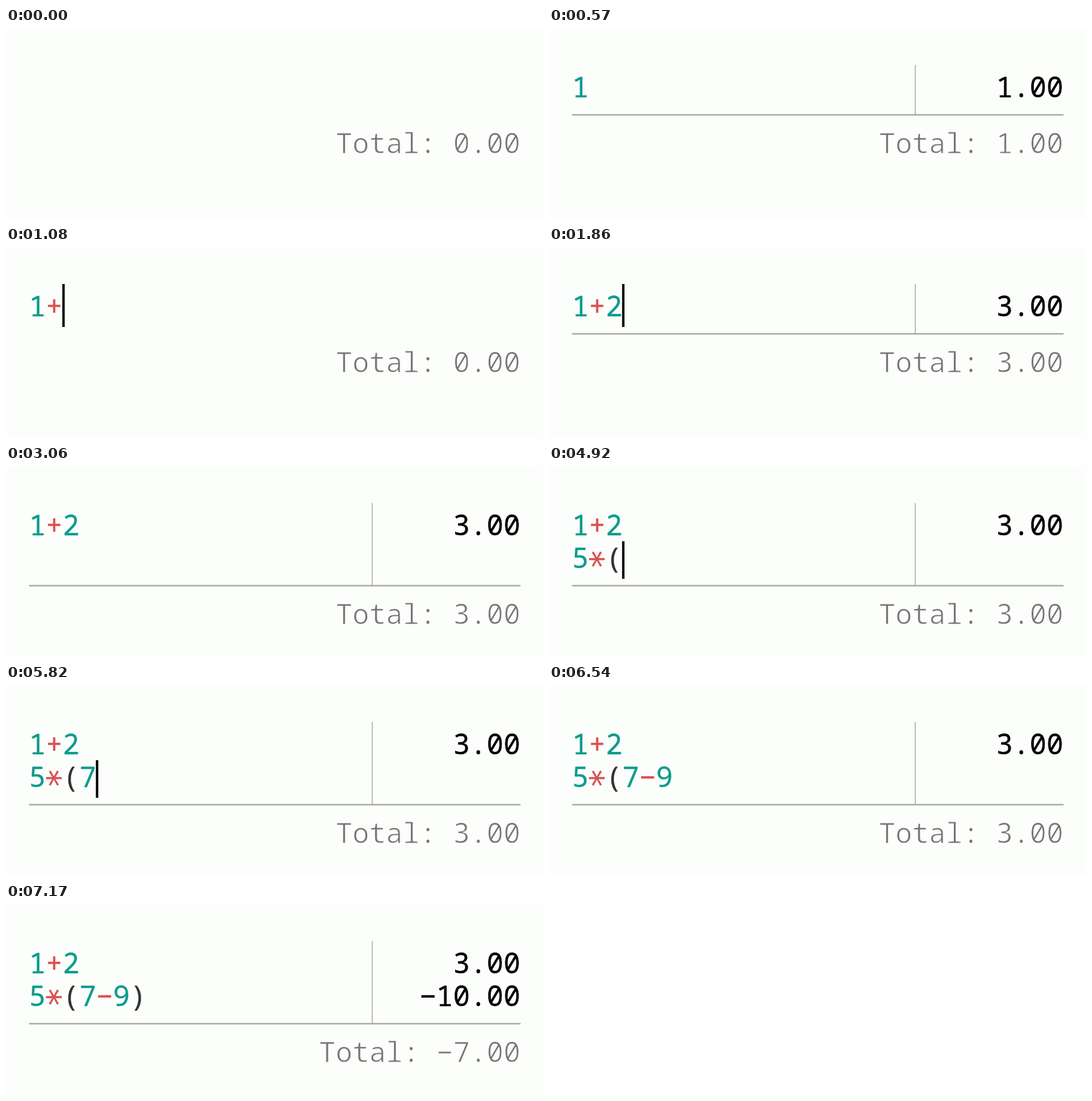
Animation of 898 by 320 pixels, one loop 7.2 s. Source, as an HTML page:

```html
<!DOCTYPE html>
<html lang="en">
<head>
<meta charset="utf-8">
<title>Calculator</title>
<style>
  html, body { margin: 0; width: 100%; height: 100%; overflow: hidden; background: #fcfefb; }
  svg { display: block; width: 100%; height: 100%; }
  text { font: 400 46.8px "Noto Sans Mono", "DejaVu Sans Mono", monospace; white-space: pre; }
  .num { fill: #0d9b8d; stroke: #0d9b8d; }
  .op { fill: #d9504f; stroke: #d9504f; }
  .paren { fill: #333; stroke: #333; }
  .input { stroke-width: .3; }
  .star { font-family: "DejaVu Sans Mono", monospace; font-size: 57px; text-anchor: middle; }
  .result { text-anchor: end; stroke: #000; stroke-width: .4; }
  /* a background-coloured outline gives the light weight */
  .total { text-anchor: end; fill: #787476; stroke: #fcfefb; stroke-width: 1; }
  .rule { stroke: #a8aaa8; }
</style>
</head>
<body>
<svg viewBox="0 0 898 320">
  <g id="lines" class="rule">
    <path id="divider" stroke-width="1.6"/>
    <path id="rule" stroke-width="2.5"/>
  </g>
  <g id="content"></g>
  <text id="total" class="total" x="860"></text>
  <rect id="caret" width="4"/>
</svg>
<script>
const LOOP = 7200, LEFT = 38.5, RIGHT = 860, PITCH = 28.08, ROW = 55, BASE = 116;
const HALF_BLINK = 300, FADE = 80;

// Typed text after each key press; the caret restarts its blink here.
const keys = [
  [120, ["1"]], [900, ["1+"]], [1620, ["1+2"]], [2070, ["1+2", ""]],
  [3270, ["1+2", "5"]], [4140, ["1+2", "5*"]], [4770, ["1+2", "5*("]],
  [5100, ["1+2", "5*(7"]], [5880, ["1+2", "5*(7−"]],
  [6150, ["1+2", "5*(7−9"]], [6690, ["1+2", "5*(7−9)"]]
];

// Row results and their total.
const answers = [
  [0, [], "0.00"], [270, ["1.00"], "1.00"], [900, [], "0.00"], [1770, ["3.00"], "3.00"],
  [3420, ["3.00", "5.00"], "8.00"], [4140, ["3.00"], "3.00"],
  [6840, ["3.00", "−10.00"], "−7.00"]
];

const $ = id => document.getElementById(id);
const latest = (list, t) => list.filter(item => item[0] <= t).pop();
const kind = c => /\d/.test(c) ? "num" : /[()]/.test(c) ? "paren" : "op";
const baseline = row => BASE + row * ROW;

function glyph(c, col, row) {
  const x = LEFT + col * PITCH, y = baseline(row);
  if (c === "*") {
    return `<text class="input op star" y="29.3" transform="translate(${x + PITCH / 2} ${y - 15}) rotate(90)">*</text>`;
  }
  return `<text class="input ${kind(c)}" x="${x}" y="${y}">${c}</text>`;
}

function layout(rows, results, total) {
  const bottom = rows.length > 1 ? 200.5 : 145.5;
  const input = rows.map((line, row) => [...line].map((c, col) => glyph(c, col, row)).join(""));
  const output = results.map((value, row) =>
    `<text class="result" x="${RIGHT}" y="${baseline(row)}">${value}</text>`);
  $("content").innerHTML = input.concat(output).join("");
  $("lines").style.display = results.length ? "" : "none";
  $("divider").setAttribute("d", `M612.5 62V${bottom}`);
  $("rule").setAttribute("d", `M${LEFT} ${bottom}H860.5`);
  $("total").textContent = "Total: " + total;
  $("total").setAttribute("y", bottom + 64.3);
}

function caretOpacity(age) {
  const phase = age % (2 * HALF_BLINK);
  if (age < HALF_BLINK) return 1;
  return phase < HALF_BLINK
    ? Math.min(1, phase / FADE)
    : Math.max(0, 1 - (phase - HALF_BLINK) / FADE);
}

function drawCaret(key, t) {
  const caret = $("caret");
  if (!key) return caret.setAttribute("opacity", 0);
  const [time, rows] = key, row = rows.length - 1;
  caret.setAttribute("x", LEFT - .5 + rows[row].length * PITCH);
  caret.setAttribute("y", row ? 126 : 62);
  caret.setAttribute("height", row ? 63 : 72);
  caret.setAttribute("opacity", caretOpacity(t - time));
}

let shownKey, shownAnswer;
function render(t) {
  const key = latest(keys, t), answer = latest(answers, t);
  if (key !== shownKey || answer !== shownAnswer) {
    layout(key ? key[1] : [""], answer[1], answer[2]);
    shownKey = key;
    shownAnswer = answer;
  }
  drawCaret(key, t);
}

const start = performance.now();
function tick(now) {
  render(Math.max(0, now - start) % LOOP);
  requestAnimationFrame(tick);
}
render(0);
requestAnimationFrame(tick);
</script>
</body>
</html>
```
